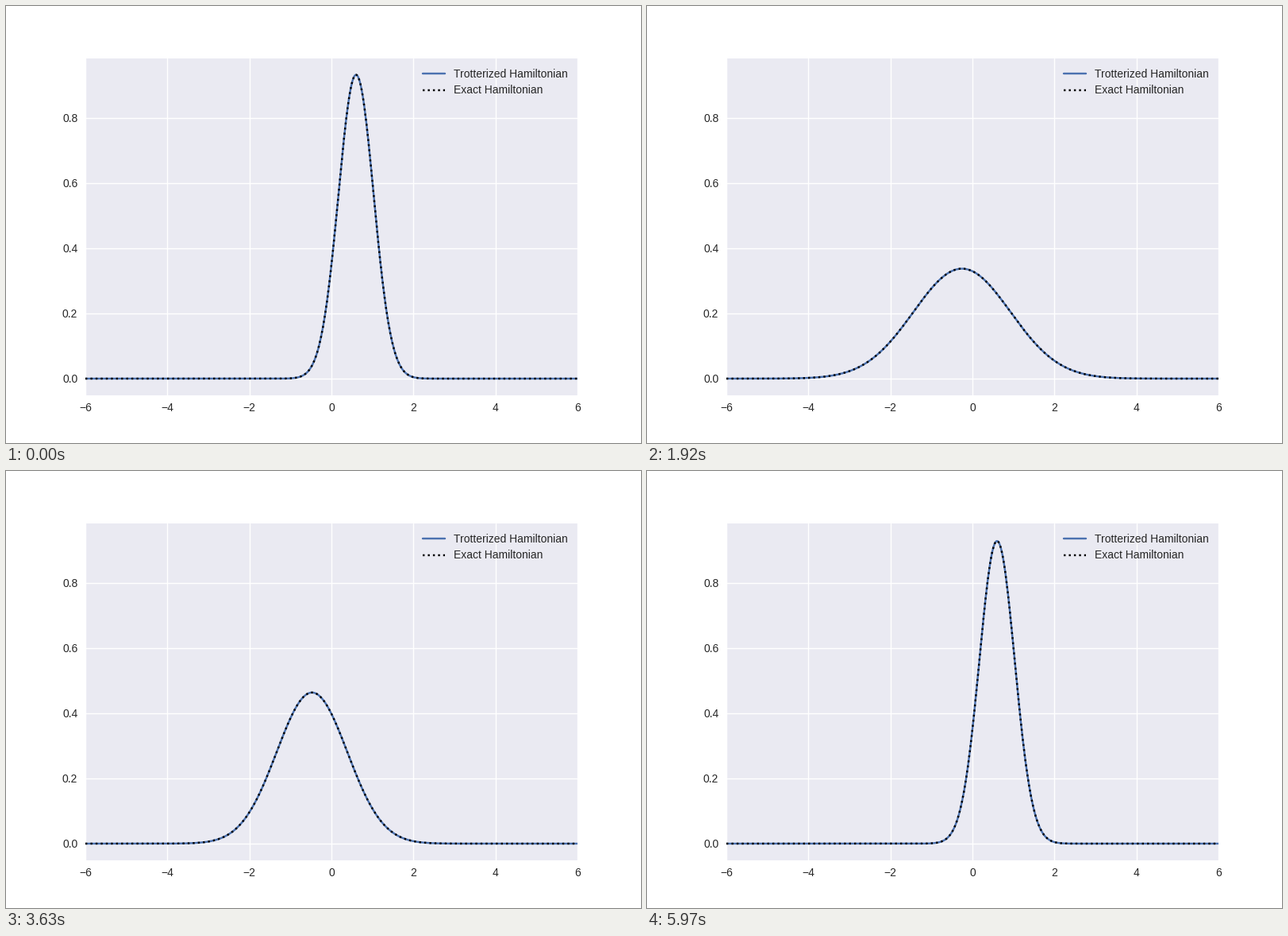
These frames come from a looping animation (800 px wide and 550 px high, 6000 ms). A matplotlib script:

```python
import numpy as np
import matplotlib.pyplot as plt
from matplotlib.animation import FuncAnimation

plt.style.use("seaborn-v0_8")
plt.rcParams["font.sans-serif"] = ["Liberation Sans"]

FRAMES, INTERVAL = 200, 30
X0 = 0.6                            # starting displacement
VAR_MIN, VAR_MAX = 0.18335, 1.67    # packet variance at the turning points and at the centre

x = np.linspace(-6, 6, 500)


def density(frame):
    """Probability density of a squeezed packet in a harmonic well."""
    phase = 2 * np.pi * frame / FRAMES
    var = VAR_MIN * np.cos(phase) ** 2 + VAR_MAX * np.sin(phase) ** 2
    shift = x - X0 * np.cos(phase)
    return np.exp(-shift ** 2 / (2 * var)) / np.sqrt(2 * np.pi * var)


fig, ax = plt.subplots(figsize=(8, 5.5), dpi=100)
trotter, = ax.plot(x, density(0), label="Trotterized Hamiltonian")
exact, = ax.plot(x, density(0), "k:", label="Exact Hamiltonian")
ax.set_xlim(-6, 6)
ax.set_ylim(-0.05, 1 / np.sqrt(2 * np.pi * VAR_MIN) + 0.05)
ax.legend(loc="upper right")


def update(frame):
    y = density(frame)
    trotter.set_ydata(y)
    exact.set_ydata(y)
    return trotter, exact


anim = FuncAnimation(fig, update, frames=FRAMES, interval=INTERVAL,
                     repeat=True, repeat_delay=0)
plt.show()
```
